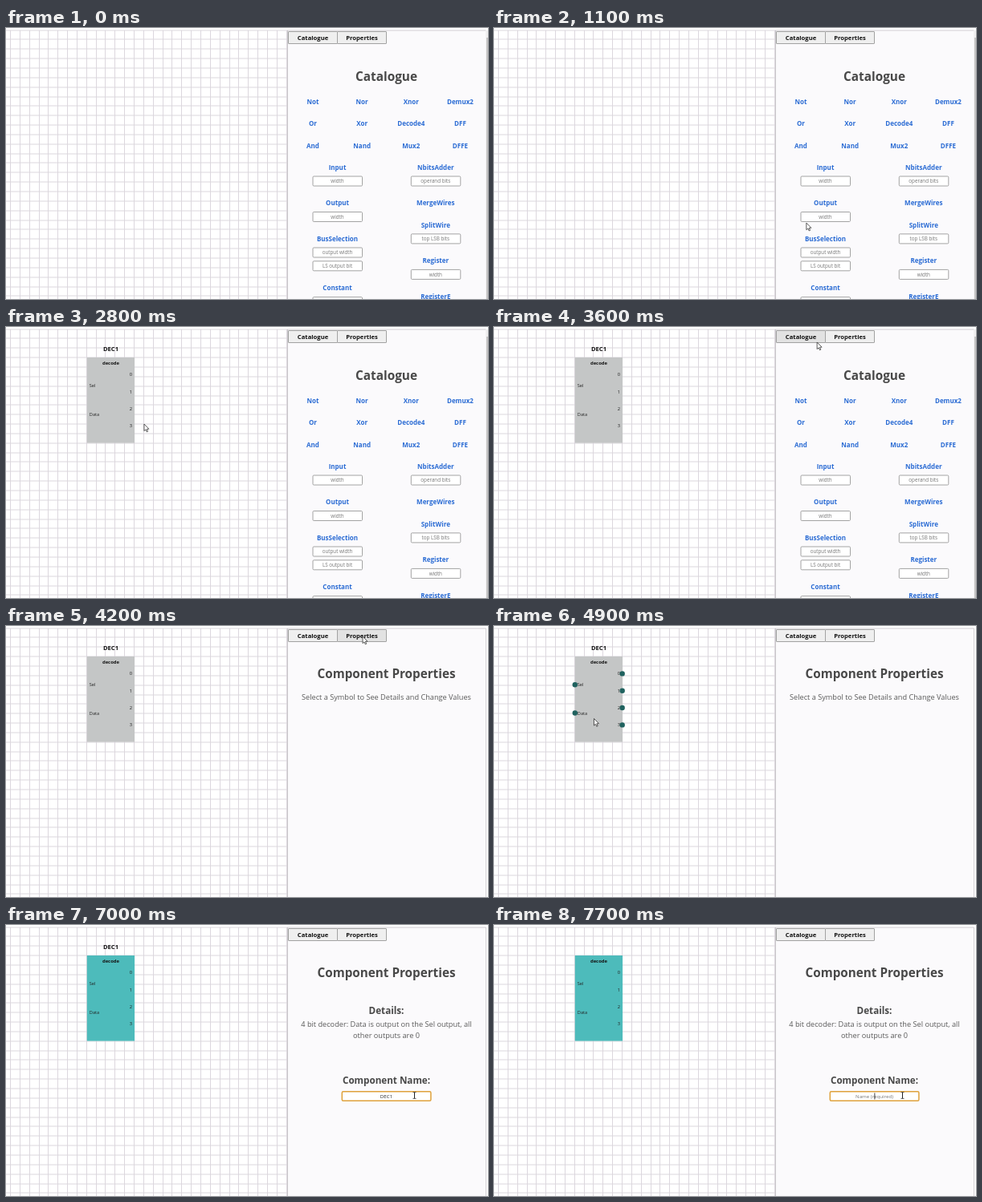
These frames come from a looping animation (600x338 px, 8 s). An HTML page with a canvas:

```html
<!DOCTYPE html>
<html lang="en">
<head>
<meta charset="utf-8">
<title>Circuit editor</title>
<style>
  html, body { margin: 0; width: 100%; height: 100%; overflow: hidden; background: #fff; }
  canvas { display: block; width: 600px; height: 338px; }
</style>
</head>
<body>
<canvas id="stage"></canvas>
<script>
const W = 600, H = 338, LOOP = 8000;
const canvas = document.getElementById('stage');
const ctx = canvas.getContext('2d');
const dpr = window.devicePixelRatio || 1;
canvas.width = W * dpr;
canvas.height = H * dpr;

const BLUE = '#2b6cd4', DARK = '#484848', HINT = '#777';
const MID = 473.5;
const CELL = 11.85;
const SYMBOL = { x: 100.8, y: 38, w: 59.3, h: 106.6 };

// Event times in ms
const ADD = 2100, OPEN_PROPS = 4200, SELECT = 5200, FOCUS = 5340, BLINK = 530;
const DELETIONS = [7100, 7300, 7500, 7700];

// Pointer path: time, x, y
const PATH = [
  [800, 306, 332], [1000, 352, 282], [1200, 425, 205], [1400, 500, 130],
  [1550, 524, 107], [1650, 523, 111.5], [1850, 523, 111.5], [2000, 512, 117],
  [2250, 510, 117], [2400, 450, 116], [2600, 265, 117], [2700, 200, 120],
  [2800, 172, 121], [2950, 158, 122], [3100, 140, 119], [3250, 140, 119],
  [3400, 230, 84], [3500, 335, 42], [3600, 402, 19], [3800, 430, 13],
  [4000, 444, 13], [4300, 444, 13], [4500, 345, 45], [4700, 190, 96],
  [4900, 124.5, 115.5], [5100, 122, 112], [5500, 122, 112], [5600, 148, 137],
  [5700, 215, 184], [5800, 284, 216], [5950, 380, 228], [6100, 475, 221],
  [6200, 508.5, 212.5]
];

function pointerAt(t) {
  if (t < PATH[0][0]) return null;
  const next = PATH.findIndex(p => p[0] > t);
  if (next < 0) return { x: PATH.at(-1)[1], y: PATH.at(-1)[2] };
  const [t0, x0, y0] = PATH[next - 1], [t1, x1, y1] = PATH[next];
  const k = (t - t0) / (t1 - t0);
  return { x: x0 + (x1 - x0) * k, y: y0 + (y1 - y0) * k };
}

const inside = (p, x, y, w, h) =>
  p !== null && p.x >= x && p.x <= x + w && p.y >= y && p.y <= y + h;

// y is the middle of the capitals
function text(str, x, y, size, color, weight = 400, align = 'center') {
  ctx.font = `${weight} ${size}px "Open Sans", "Noto Sans", sans-serif`;
  ctx.textAlign = align;
  ctx.fillStyle = color;
  ctx.fillText(str, x, y + size * 0.36);
}

function rect(x, y, w, h, color) {
  ctx.fillStyle = color;
  ctx.fillRect(x, y, w, h);
}

function box(x, y, w, h, fill, stroke, line, radius) {
  ctx.beginPath();
  ctx.roundRect(x, y, w, h, radius);
  ctx.fillStyle = fill;
  ctx.fill();
  ctx.strokeStyle = stroke;
  ctx.lineWidth = line;
  ctx.stroke();
}

function drawGrid() {
  for (let x = 6; x < 350; x += CELL) rect(Math.round(x) - 1, 3, 1, H, '#dcd7de');
  for (let y = 2.6; y < H; y += CELL) rect(0, Math.round(y) - 0.5, 350, 1, '#dcd7de');
}

function drawPanel(t, pointer) {
  const props = t >= OPEN_PROPS;
  rect(350, 2.5, 250, H, '#fbfafc');
  rect(350, 2.5, 247.5, 1, '#d2d0d3');
  rect(350, 3, 1, H, '#c9c7ca');
  if (props) {
    rect(597, 3, 1, H, '#d4d2d5');
    rect(598, 3, 2, H, '#fff');
  } else {
    rect(597, 3, 3, H, '#f0eff0');
    rect(598, 12, 2, H, '#c4c3c4');
  }
  drawTab('Catalogue', 351.5, pointer);
  drawTab('Properties', 412.5, pointer);
  if (!props) drawCatalogue();
  else if (t < SELECT) drawEmptyProps();
  else drawDetails(t);
}

function drawTab(label, x, pointer) {
  const hot = inside(pointer, x, 4, 61, 16);
  box(x, 4.5, 61, 15, hot ? '#e2e2e2' : '#efefef', '#a2a2a2', 1, 0.5);
  text(label, x + 30.5, 12.2, 7.65, '#111', 700);
}

const GATES = [
  ['Not', 'Nor', 'Xnor', 'Demux2'],
  ['Or', 'Xor', 'Decode4', 'DFF'],
  ['And', 'Nand', 'Mux2', 'DFFE']
];
const LEFT_ITEMS = [
  ['Input', 'width'], ['Output', 'width'],
  ['BusSelection', 'output width', 'LS output bit'], ['Constant', '']
];
const RIGHT_ITEMS = [
  ['NbitsAdder', 'operand bits'], ['MergeWires'],
  ['SplitWire', 'top LSB bits'], ['Register', 'width'], ['RegisterE']
];

function drawItems(items, x) {
  let y = 174;
  for (const [name, ...fields] of items) {
    text(name, x, y, 8, BLUE, 700);
    fields.forEach((hint, i) => {
      const fy = y + 17 + i * 16.8;
      box(x - 30.5, fy - 6, 61.5, 12, '#fff', '#999', 0.9, 1.2);
      text(hint, x, fy + 0.2, 6.25, HINT);
    });
    y += 27.4 + fields.length * 17.1;
  }
}

function drawCatalogue() {
  text('Catalogue', MID, 60, 15.35, DARK, 700);
  GATES.forEach((row, r) => row.forEach((name, c) =>
    text(name, 382 + c * 61.15, 92 + r * 27.4, 8, BLUE, 700)));
  drawItems(LEFT_ITEMS, 412.5);
  drawItems(RIGHT_ITEMS, 534.8);
}

function drawEmptyProps() {
  text('Component Properties', MID, 60, 15.25, DARK, 700);
  text('Select a Symbol to See Details and Change Values', MID, 89, 9.18, '#5a5a5a');
}

const nameAt = t => 'DEC1'.slice(0, 4 - DELETIONS.filter(d => t >= d).length);

function drawDetails(t) {
  text('Component Properties', MID, 60, 15.25, DARK, 700);
  text('Details:', MID, 107.3, 11.65, DARK, 700);
  text('4 bit decoder: Data is output on the Sel output, all', MID, 123.5, 9.2, '#5a5a5a');
  text('other outputs are 0', MID, 137.5, 9.2, '#5a5a5a');
  text('Component Name:', MID, 194.3, 11.65, DARK, 700);
  box(418.3, 207.7, 110.6, 11.6, '#fff', '#dfa23c', 1.5, 1.5);

  const name = nameAt(t);
  text(name || 'Name (required)', MID, 213.7, 6.15, name ? '#222' : HINT);
  const blinkOn = Math.floor((t - FOCUS) / BLINK) % 2 === 0;
  if (t >= DELETIONS[0] || (t >= FOCUS && blinkOn)) {
    const half = name ? ctx.measureText(name).width / 2 : 0;
    rect(MID + half, 209.5, 0.8, 8, '#111');
  }
}

function drawSymbol(t, pointer) {
  const { x, y, w, h } = SYMBOL;
  const mid = x + w / 2;
  const outs = [0, 1, 2, 3].map(i => y + h * (i + 1) / 5 - 0.2);
  const ins = [y + h / 3 - 0.3, y + h * 2 / 3 - 0.5];

  text(nameAt(t), mid, 27.2, 7.6, '#111', 700);
  rect(x, y, w, h, t >= SELECT ? '#4dbbbb' : '#c4c6c6');
  text('decode', mid, 44.4, 5.9, '#151515', 700);
  ['Sel', 'Data'].forEach((s, i) => text(s, x + 3, ins[i], 5.6, '#222', 400, 'left'));
  outs.forEach((oy, i) => text(i, x + w - 3, oy, 5.8, '#222', 400, 'right'));

  if (!inside(pointer, x, y, w, h)) return;
  ctx.fillStyle = '#20625f';
  const dot = (cx, cy) => {
    ctx.beginPath();
    ctx.arc(cx, cy, 3.2, 0, Math.PI * 2);
    ctx.fill();
  };
  ins.forEach(cy => dot(x, cy));
  outs.forEach(cy => dot(x + w - 0.4, cy + 0.3));
}

const ARROW = [[0, 0], [0, 8.6], [2, 6.9], [3.3, 9.8], [4.7, 9.2], [3.4, 6.3], [6, 6.2]];

function drawPointer(t, { x, y }) {
  if (t >= SELECT && inside({ x, y }, 418, 207, 111, 13)) {
    rect(x - 0.5, y - 3.8, 1, 7.6, '#222');
    rect(x - 2, y - 4.2, 4, 0.8, '#333');
    rect(x - 2, y + 3.4, 4, 0.8, '#333');
    return;
  }
  ctx.beginPath();
  ARROW.forEach(([dx, dy]) => ctx.lineTo(x + dx, y + dy));
  ctx.closePath();
  ctx.fillStyle = '#fff';
  ctx.fill();
  ctx.lineWidth = 0.8;
  ctx.strokeStyle = '#333';
  ctx.stroke();
}

function draw(t) {
  const pointer = pointerAt(t);
  ctx.setTransform(dpr, 0, 0, dpr, 0, 0);
  rect(0, 0, W, H, '#fff');
  drawGrid();
  if (t >= ADD) drawSymbol(t, pointer);
  drawPanel(t, pointer);
  if (pointer) drawPointer(t, pointer);
}

const start = performance.now();
function tick() {
  draw((performance.now() - start) % LOOP);
  requestAnimationFrame(tick);
}
tick();
</script>
</body>
</html>
```
